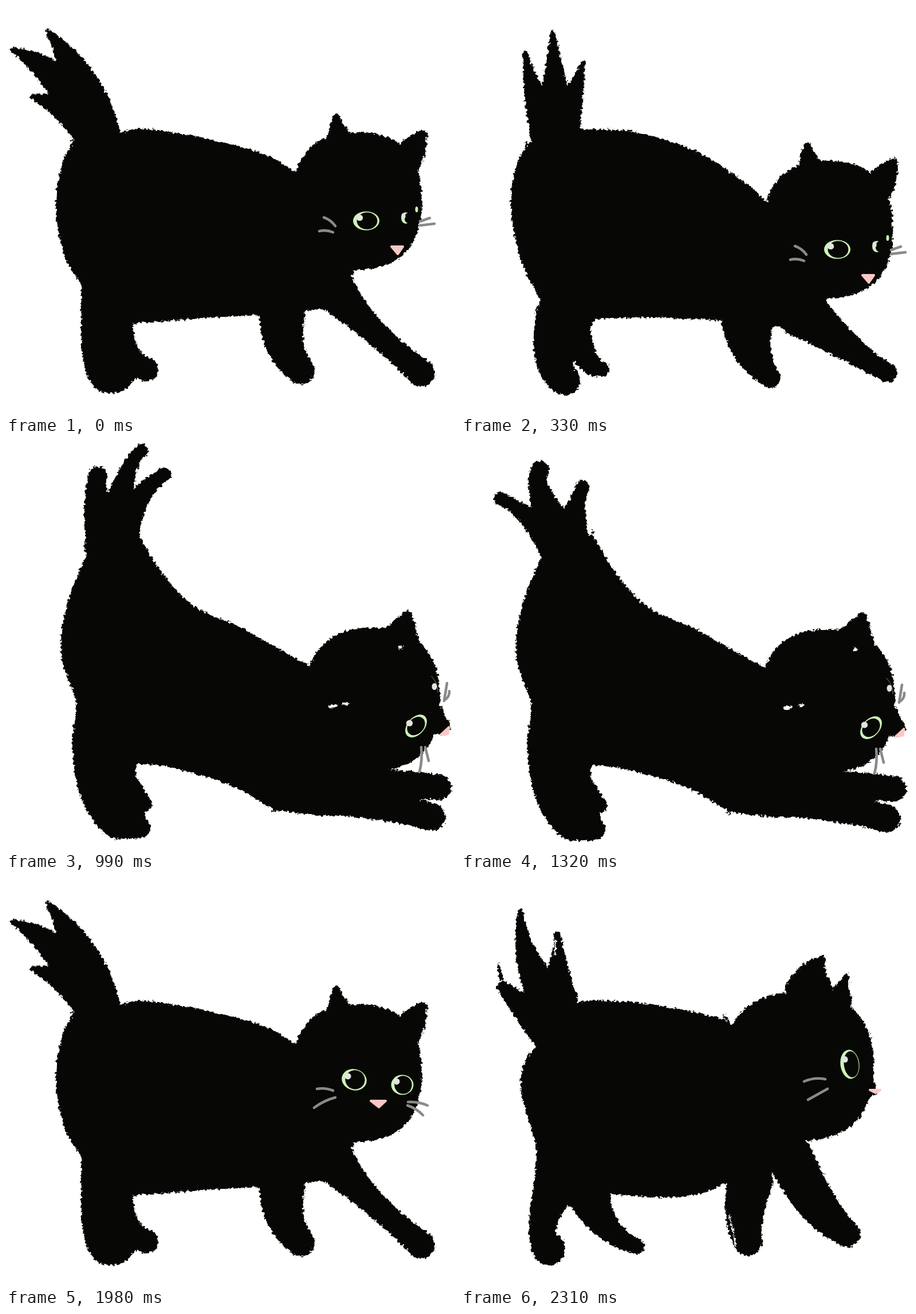
Animation of 784x714 px, one loop 2640 ms. Source, as an HTML page:

```html
<!DOCTYPE html>
<html lang="en">
<head>
<meta charset="utf-8">
<title>Stretching cat</title>
<style>
  html, body { margin: 0; width: 100%; height: 100%; overflow: hidden; background: #fff; }
  svg { position: absolute; left: 0; top: 0; width: 784px; height: 714px; opacity: 0; will-change: opacity; }
</style>
</head>
<body>
<script>
const STEP = 330;
const INK = '#070805', GREEN = '#cdf2b8', SHINE = '#e2e4e2', PINK = '#fbc7c4', GREY = '#8a8a8a', CHALK = '#777';

let seed = 7;
const rand = () => (seed = (seed * 16807) % 2147483647) / 2147483647 - 0.5;

const path = (d, fill = INK) => `<path d="${d}" fill="${fill}"/>`;
const stroke = (d, color, width, dash = '') =>
  `<path d="${d}" fill="none" stroke="${color}" stroke-width="${width}" stroke-linecap="round" stroke-dasharray="${dash}"/>`;
const oval = (x, y, rx, ry, fill = INK, turn = 0) =>
  `<ellipse cx="${x}" cy="${y}" rx="${rx}" ry="${ry}" fill="${fill}" transform="rotate(${turn} ${x} ${y})"/>`;
const move = (x, y, art) => `<g transform="translate(${x} ${y})">${art}</g>`;

// Smooth closed outline through a few "x,y" points; a trailing * makes a corner.
function torso(text) {
  const pts = text.trim().split(/\s+/).flatMap(p => {
    const xy = p.replace('*', '').split(',').map(Number);
    return p.endsWith('*') ? [xy, xy] : [xy];
  });
  const at = i => pts[(i + pts.length) % pts.length];
  const bezier = pts.map((b, i) => {
    const a = at(i - 1), c = at(i + 1), e = at(i + 2);
    return `C${b.map((v, k) => v + (c[k] - a[k]) / 6)} ${c.map((v, k) => v - (e[k] - b[k]) / 6)} ${c}`;
  });
  return path('M' + pts[0] + bezier.join(''));
}

// Curved, tapering shape through three circles: x, y, radius each.
function limb(x0, y0, r0, x1, y1, r1, x2, y2, r2) {
  const mix = (a, m, b, t) => {
    const c = 2 * m - (a + b) / 2;
    return a * (1 - t) ** 2 + 2 * c * t * (1 - t) + b * t * t;
  };
  const spot = t => [mix(x0, x1, x2, t), mix(y0, y1, y2, t)];
  const left = [], right = [];
  for (let t = 0; t <= 1.001; t += 0.05) {
    const [x, y] = spot(t), [px, py] = spot(t - 0.01), [qx, qy] = spot(t + 0.01);
    const k = mix(r0, r1, r2, t) / Math.hypot(qx - px, qy - py);
    const nx = (py - qy) * k, ny = (qx - px) * k;
    left.push([x + nx, y + ny]);
    right.unshift([x - nx, y - ny]);
  }
  return path('M' + [...left, ...right].join('L') + 'Z') + oval(x0, y0, r0, r0) + oval(x2, y2, r2, r2);
}

// Slightly squared ellipse.
function skull(x, y, rx, ry) {
  const bend = v => Math.sign(v) * Math.abs(v) ** (2 / 2.4);
  const pts = Array.from({ length: 90 }, (_, i) => {
    const a = i * Math.PI / 45;
    return [x + rx * bend(Math.cos(a)), y + ry * bend(Math.sin(a))];
  });
  return path('M' + pts.join('L') + 'Z');
}

// Arc from one point to another, pushed sideways by bow.
function arc(x0, y0, x1, y1, bow = 0) {
  const k = 2 * bow / Math.hypot(x1 - x0, y1 - y0);
  return `M${x0},${y0}Q${(x0 + x1) / 2 - (y1 - y0) * k},${(y0 + y1) / 2 + (x1 - x0) * k} ${x1},${y1}`;
}

// Bundle of loose, grainy strands along an arc.
function chalk(x0, y0, x1, y1, bow = 0, count = 4) {
  const near = v => v + rand() * (count + 3);
  return Array.from({ length: count }, () =>
    stroke(arc(near(x0), near(y0), near(x1), near(y1), bow + rand() * count), CHALK + '88', 0.8, '2 2.2')).join('');
}

function eye(x, y, rx, ry, turn = 0, shift = 1.5) {
  return oval(x, y, rx, ry, GREEN, turn)
    + oval(x + shift, y, rx * 0.78, ry * 0.9, INK, turn)
    + oval(x - rx * 0.5, y - ry * 0.33, 2.5 + rx * 0.14, 5.5, SHINE);
}

const nose = (x, y, w, h, turn = 0) =>
  `<path d="M${-w},0H${w}L1,${h}Z" transform="translate(${x} ${y}) rotate(${turn})"
    fill="${PINK}" stroke="${PINK}" stroke-width="4" stroke-linejoin="round"/>`;

const whisker = (x0, y0, x1, y1, bow = -2) => stroke(arc(x0, y0, x1, y1, bow), GREY, 4.6);

// Each pose has fur (rough edged), chalk marks and a face.
const walkHead = skull(613, 341, 113, 120)
  + limb(592, 262, 36, 580, 222, 18, 577, 196, 7)
  + limb(695, 275, 28, 714, 245, 21, 727, 225, 9);
const walkHeadMarks = chalk(573, 200, 558, 266, 0, 6) + chalk(590, 206, 634, 264) + chalk(718, 224, 672, 270, 0, 5)
  + chalk(555, 443, 685, 438, 11);
const walkFace = eye(629, 376, 23, 16.5) + eye(698, 371, 8, 10, 0, 4) + oval(717, 356, 2.5, 5, GREEN)
  + nose(683, 421, 10, 13)
  + whisker(555, 370, 575, 385) + whisker(547, 394, 571, 396)
  + whisker(723, 377, 740, 371, 0) + whisker(723, 384, 748, 381, 0);
const turnFace = eye(608, 353, 22, 18.5, 15) + eye(692, 362, 19.5, 17.5)
  + nose(650, 390, 13, 11)
  + whisker(543, 369, 571, 372) + whisker(538, 402, 575, 384)
  + whisker(702, 392, 736, 398) + whisker(701, 398, 728, 415);

const walk = {
  fur: torso(`118,236* 202,221* 245,215 350,232 450,259 506,291* 600,380 605,470 560,530* 440,540* 350,546
      225,555* 150,540 131,487 103,440 87,355 97,280`)
    + limb(160, 225, 39, 128, 130, 29, 73, 44, 4)
    + limb(160, 225, 39, 90, 130, 27, 12, 77, 4)
    + limb(160, 225, 39, 95, 178, 20, 44, 159, 4)
    + limb(184, 490, 52, 174, 590, 42, 184, 634, 44)
    + limb(190, 560, 32, 208, 610, 26, 246, 636, 20)
    + limb(482, 540, 40, 488, 595, 33, 515, 638, 24)
    + limb(570, 495, 40, 640, 567, 22, 725, 642, 24)
    + walkHead,
  marks: walkHeadMarks + chalk(453, 460, 455, 580, 15, 7) + chalk(553, 503, 513, 538, 0, 6)
    + chalk(221, 507, 215, 655, 30, 6) + chalk(187, 620, 255, 652, 8) + chalk(222, 551, 325, 546, 0, 3),
  face: walkFace
};

const sink = {
  fur: torso(`116,240* 206,216* 300,220 410,254 500,312 530,340* 640,420 640,510 560,560 450,550* 330,545
      236,548* 180,580 131,500 103,440 87,350 95,285`)
    + limb(160, 225, 40, 128, 150, 18, 113, 82, 4)
    + limb(165, 220, 40, 163, 120, 18, 160, 46, 4)
    + limb(175, 215, 34, 198, 150, 16, 213, 101, 4)
    + limb(180, 545, 50, 164, 615, 35, 182, 655, 26)
    + limb(205, 560, 20, 218, 615, 20, 246, 635, 13)
    + limb(500, 550, 45, 510, 605, 33, 540, 650, 18)
    + limb(595, 535, 45, 680, 600, 24, 745, 642, 17)
    + move(28, 50, walkHead),
  marks: move(28, 50, walkHeadMarks) + chalk(468, 480, 466, 580, 15, 6) + chalk(235, 530, 196, 610, 5),
  face: move(28, 50, walkFace)
};

const bow = {
  fur: torso(`120,232* 216,208* 275,220 335,234 420,282 480,322 530,366* 600,470 560,575 490,580* 420,548
      310,535 243,530* 180,560 131,550 125,490 103,440 88,350 102,270`)
    + limb(160, 225, 38, 142, 165, 16, 142, 121, 5)
    + limb(170, 220, 40, 171, 135, 19, 188, 76, 9)
    + limb(180, 215, 36, 203, 170, 16, 236, 141, 3)
    + limb(180, 545, 50, 156, 610, 26, 193, 661, 19)
    + limb(205, 555, 17, 212, 605, 16, 246, 635, 12)
    + limb(520, 560, 42, 575, 622, 32, 700, 632, 24)
    + limb(660, 600, 30, 715, 627, 22, 762, 641, 11)
    + skull(642, 452, 118, 119)
    + limb(622, 355, 38, 619, 322, 22, 616, 296, 8)
    + limb(722, 375, 28, 742, 353, 22, 757, 336, 11)
    + oval(604, 593, 20, 5, '#fff', 25) + oval(764, 641, 5, 4, '#fff') + oval(248, 637, 6, 3, '#fff', 25),
  marks: stroke('M147,317C270,370 250,490 467,503', '#2b2b2b', 1)
    + chalk(612, 294, 586, 382, 4, 5) + chalk(622, 296, 660, 375, 0, 5)
    + chalk(140, 122, 126, 205) + chalk(152, 122, 157, 190) + chalk(184, 130, 186, 190) + chalk(186, 190, 222, 150)
    + chalk(530, 369, 577, 346) + chalk(560, 525, 745, 530, 38) + chalk(596, 547, 578, 583)
    + chalk(578, 600, 718, 612) + chalk(718, 612, 640, 655, -18)
    + chalk(467, 532, 555, 645, 10) + chalk(243, 525, 181, 610) + chalk(217, 553, 229, 602),
  face: eye(677, 481, 25.5, 20) + eye(749, 470, 9.5, 17.5, -6, 3)
    + nose(749, 508, 11, 11)
    + whisker(600, 498, 629, 502) + whisker(603, 517, 633, 515)
    + whisker(762, 491, 779, 477) + whisker(764, 493, 781, 492, 0)
};

const rise = {
  ...bow,
  face: eye(658, 470, 25, 18.5, 4) + eye(739, 467, 12.5, 18.5, 8, 3)
    + nose(720, 511, 9, 9)
    + whisker(584, 488, 620, 492, 0) + whisker(583, 506, 610, 500)
    + whisker(755, 495, 779, 488, 0) + whisker(755, 505, 781, 508, 0)
};

const stretch = {
  fur: torso(`143,192* 229,158* 270,225 325,285 410,325 495,373 520,386* 600,440 640,575 600,650 470,645*
      390,600 290,570 230,563* 190,600 125,560 116,520 122,455 96,370 108,280`)
    + limb(178, 500, 58, 175, 590, 52, 200, 652, 43)
    + limb(200, 600, 30, 222, 620, 24, 240, 632, 15)
    + limb(200, 670, 22, 220, 674, 20, 234, 675, 18)
    + limb(600, 600, 28, 680, 600, 26, 756, 604, 22)
    + limb(500, 605, 42, 640, 632, 28, 743, 656, 24)
    + skull(640, 450, 118, 125)
    + limb(720, 470, 35, 745, 488, 28, 762, 497, 14)
    + limb(685, 355, 38, 695, 322, 22, 700, 304, 9)
    + oval(570, 462, 9, 3, '#fff', -10) + oval(594, 458, 6, 2, '#fff') + oval(689, 360, 4, 3, '#fff'),
  marks: chalk(577, 382, 552, 465, 0, 14) + chalk(590, 388, 635, 450) + chalk(560, 462, 632, 450)
    + chalk(695, 299, 645, 360, 0, 6) + chalk(700, 300, 723, 375)
    + chalk(545, 556, 728, 580, 5, 6) + chalk(600, 573, 568, 586, 0, 8)
    + chalk(578, 596, 758, 640, -6, 7) + chalk(758, 640, 755, 675, -6, 6) + chalk(475, 644, 720, 664, -6, 6),
  face: eye(716, 497, 23, 15, -49, 0) + oval(748, 428, 4.5, 6, SHINE) + stroke(arc(743, 410, 754, 438, -3), GREEN + '88', 1)
    + nose(766, 506, 10, 7, -43)
    + whisker(770, 422, 765, 453, 0) + whisker(774, 436, 768, 450)
    + whisker(725, 534, 722, 577) + whisker(732, 534, 738, 558, 0)
};

const fan = limb(180, 180, 42, 160, 110, 23, 160, 60, 17)
  + limb(183, 180, 42, 208, 65, 17, 237, 15, 12)
  + limb(186, 185, 43, 230, 102, 20, 276, 57, 12);
const swing = limb(180, 190, 42, 120, 130, 18, 68, 96, 11)
  + limb(183, 180, 42, 140, 90, 20, 138, 46, 16)
  + limb(186, 185, 43, 200, 115, 18, 212, 76, 12);

const step = {
  fur: torso(`122,305* 200,219* 240,214 350,224 462,247* 600,380 560,500 470,530* 420,552 350,559 262,553*
      190,575 133,540 131,470 106,380 108,330`)
    + limb(160, 225, 40, 117, 140, 20, 104, 57, 4)
    + limb(168, 215, 36, 170, 150, 16, 168, 98, 5)
    + limb(155, 265, 38, 112, 228, 24, 74, 192, 11)
    + limb(175, 520, 45, 144, 600, 25, 153, 649, 29)
    + limb(225, 560, 36, 256, 612, 23, 307, 645, 13)
    + limb(505, 530, 40, 495, 590, 33, 501, 636, 25)
    + limb(575, 490, 40, 622, 570, 34, 674, 623, 23)
    + skull(590, 330, 131, 130)
    + limb(608, 200, 42, 615, 168, 27, 630, 143, 7)
    + limb(660, 215, 22, 666, 193, 13, 673, 173, 5)
    + limb(700, 365, 24, 712, 370, 14, 722, 374, 6)
    + stroke(arc(65, 152, 71, 178), INK, 5)
    + stroke(arc(165, 108, 164, 134), '#fff', 3) + stroke(arc(469, 590, 480, 644), '#fff', 2),
  marks: chalk(631, 142, 645, 228, 0, 6) + chalk(651, 184, 674, 171) + chalk(674, 171, 667, 222)
    + chalk(624, 442, 540, 520, 0, 6) + chalk(540, 520, 528, 592, 0, 6)
    + chalk(511, 455, 635, 608, 0, 3) + chalk(395, 557, 530, 490, 8, 5)
    + chalk(262, 546, 185, 562, -10, 5) + chalk(185, 562, 167, 598)
    + chalk(130, 465, 134, 545, -4) + chalk(473, 522, 468, 615, 7) + chalk(608, 468, 682, 606, -5),
  face: eye(679, 326, 16.5, 25.5, -7, 2.5) + nose(723, 371, 9, 5)
    + whisker(599, 356, 636, 352, -3) + whisker(606, 388, 640, 369, 0)
};

const poses = [
  walk,
  sink,
  bow,
  { ...stretch, fur: fan + stretch.fur },
  { fur: move(0, 3, swing + stretch.fur), marks: move(0, 3, stretch.marks), face: move(0, 3, stretch.face) },
  rise,
  { ...walk, face: turnFace },
  step
];

// Noise is made opaque so the edges wander evenly to both sides.
document.body.innerHTML = poses.map((p, i) => `<svg viewBox="0 0 784 714">
  <filter id="rough${i}" filterUnits="userSpaceOnUse" x="0" y="0" width="784" height="714" color-interpolation-filters="sRGB">
    <feTurbulence type="fractalNoise" baseFrequency=".2" numOctaves="3" seed="4"/>
    <feColorMatrix values="1 0 0 0 0  0 1 0 0 0  0 0 1 0 0  0 0 0 0 1" result="noise"/>
    <feDisplacementMap in="SourceGraphic" in2="noise" scale="9" xChannelSelector="R" yChannelSelector="G"/>
  </filter>
  <g filter="url(#rough${i})">${p.fur}</g>${p.marks}${p.face}</svg>`).join('');

const sheets = [...document.querySelectorAll('svg')];
const start = performance.now();
function draw() {
  const now = Math.floor((performance.now() - start) / STEP) % sheets.length;
  sheets.forEach((s, i) => { s.style.opacity = i === now ? 1 : 0; });
  requestAnimationFrame(draw);
}
draw();
</script>
</body>
</html>
```
